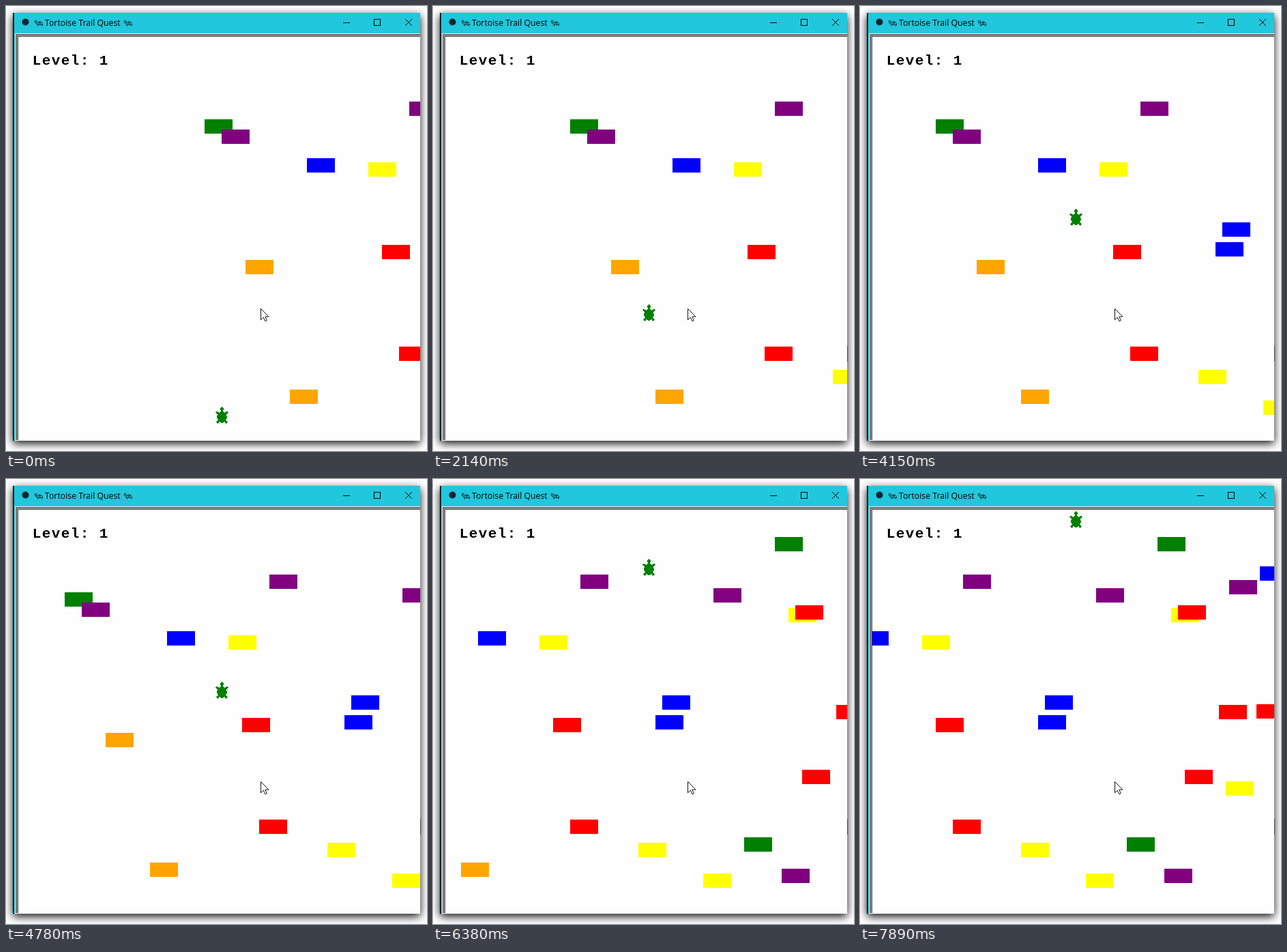
An HTML page for the animation above (8 s loop, 617x652 px).

```html
<!DOCTYPE html>
<html lang="en">
<head>
<meta charset="utf-8">
<title>Tortoise Trail Quest</title>
<style>
  html, body { margin: 0; width: 100%; height: 100%; overflow: hidden; background: #fff; }
  svg { display: block; width: 617px; height: 652px; }
  .crisp { shape-rendering: crispEdges; }
  .title { font: 12.3px 'Open Sans', sans-serif; }
  .level { font: bold 21px 'Courier New', 'Liberation Mono', monospace; letter-spacing: 1.4px; }
</style>
</head>
<body>
<svg viewBox="0 0 617 652">
  <defs>
    <filter id="blur" x="-10%" y="-10%" width="120%" height="120%"><feGaussianBlur stdDeviation="6.5"/></filter>
    <clipPath id="field"><rect x="18" y="45" width="589" height="591"/></clipPath>
    <g id="pet" fill="none" stroke="#15343a">
      <path d="M3 7.5Q4 3 7.5 3T12 7.5ZM3 5.5L.5 4.5V1.5H3V5M4.5 7V9.5M10.5 7V9.5M5 5H10M7.5 3V7"/>
    </g>
    <path id="half" d="M0 -16L2 -14 1 -10 4 -7 7 -9 9 -8 6 -5 7 -1 5 3 8 6 6 8 4 5 0 7Z"/>
  </defs>

  <rect x="10" y="14" width="597" height="627" opacity=".95" filter="url(#blur)"/>

  <g class="crisp">
    <rect x="10" y="10" width="597" height="627" fill="#10262c"/>
    <rect x="12" y="10" width="595" height="627" fill="#21c7dc"/>
    <rect x="13" y="40" width="594" height="597" fill="#f0f0f0"/>
    <rect x="14" y="41" width="593" height="595" fill="#706c70"/>
    <rect x="16" y="43" width="591" height="593" fill="#a8a4a6"/>
    <rect x="17" y="44" width="590" height="592" fill="#404040"/>
    <rect x="18" y="45" width="589" height="591" fill="#fefefe"/>
  </g>

  <circle cx="28.5" cy="23.5" r="5" fill="#14242b"/>
  <use href="#pet" x="42" y="20"/>
  <text class="title" x="57" y="29">Tortoise Trail Quest</text>
  <use href="#pet" x="173" y="20"/>
  <g fill="none" stroke="#000">
    <path class="crisp" d="M494 24.5H504M539.5 19.5H548.5V28.5H539.5Z"/>
    <path d="M585 19L595 29M595 19L585 29"/>
  </g>

  <text class="level" x="38.7" y="86">Level: 1</text>
  <g id="cars" class="crisp" clip-path="url(#field)"></g>
  <rect id="edge" class="crisp" x="607" y="498" width="1" height="23" fill="#444"/>
  <g id="turtle" class="crisp" fill="green" stroke="green">
    <use href="#half"/>
    <use href="#half" transform="scale(-1 1)"/>
  </g>
  <path d="M373.5 443.5V459.8L377.3 456.2L379.9 461.8L382.3 460.7L379.8 455.2H384.9Z" fill="#fff" stroke="#111"/>
</svg>
<script>
const LOOP = 8000, LAST_TICK = 68;
const BEAT = 230.5, LONG = 149;      // two ticks per beat: a long one, then a short one
const SPAWN_X = 591, STEP = 5, HOP = 10;
const CUT = 46, SKIPPED = 20;        // at this tick the game leaps ahead
const $ = id => document.getElementById(id);

// Per colour: [move on which the car enters, top of its lane].
const traffic = {
  green: [[-60, 166], [48, 525], [57, 85]],
  orange: [[-48, 372], [-35, 562]],
  blue: [[-30, 223], [22, 346], [24, 317], [87, 128]],
  yellow: [[-12, 229], [17, 533], [36, 578], [61, 189], [77, 443]],
  purple: [[-55, 181], [0, 140], [39, 160], [59, 571], [78, 148]],
  red: [[-8, 350], [-3, 499], [63, 185], [65, 426], [75, 331], [86, 330]]
};

function addCar(fill, [entry, y]) {
  const el = document.createElementNS('http://www.w3.org/2000/svg', 'rect');
  const attrs = { fill, y, width: 41, height: 21 };
  for (const key in attrs) el.setAttribute(key, attrs[key]);
  $('cars').append(el);
  return { el, entry };
}
const cars = Object.entries(traffic).flatMap(([fill, list]) => list.map(car => addCar(fill, car)));

function tickAt(t) {
  const tick = 2 * Math.floor(t / BEAT) + (t % BEAT >= LONG ? 1 : 0);
  return Math.min(tick, LAST_TICK);
}

// The turtle hops on most ticks, waits for traffic before the cut and stops near the top.
function hopsAt(tick) {
  return tick < CUT
    ? Math.min(29, Math.round(tick * 0.82))
    : Math.min(54, 40 + Math.round((tick - CUT) * 0.8));
}

const show = (el, on) => el.setAttribute('visibility', on ? 'visible' : 'hidden');

function draw(t) {
  const tick = tickAt(t);
  const moves = tick + (tick >= CUT ? SKIPPED : 0);
  for (const { el, entry } of cars) {
    el.setAttribute('x', SPAWN_X - STEP * (moves - entry));
    show(el, moves >= entry);
  }
  show($('edge'), tick >= 2);
  $('turtle').setAttribute('transform', `translate(316.5 ${603.5 - HOP * hopsAt(tick)})`);
}

const start = performance.now();
function loop() {
  draw((performance.now() - start) % LOOP);
  requestAnimationFrame(loop);
}
loop();
</script>
</body>
</html>
```
